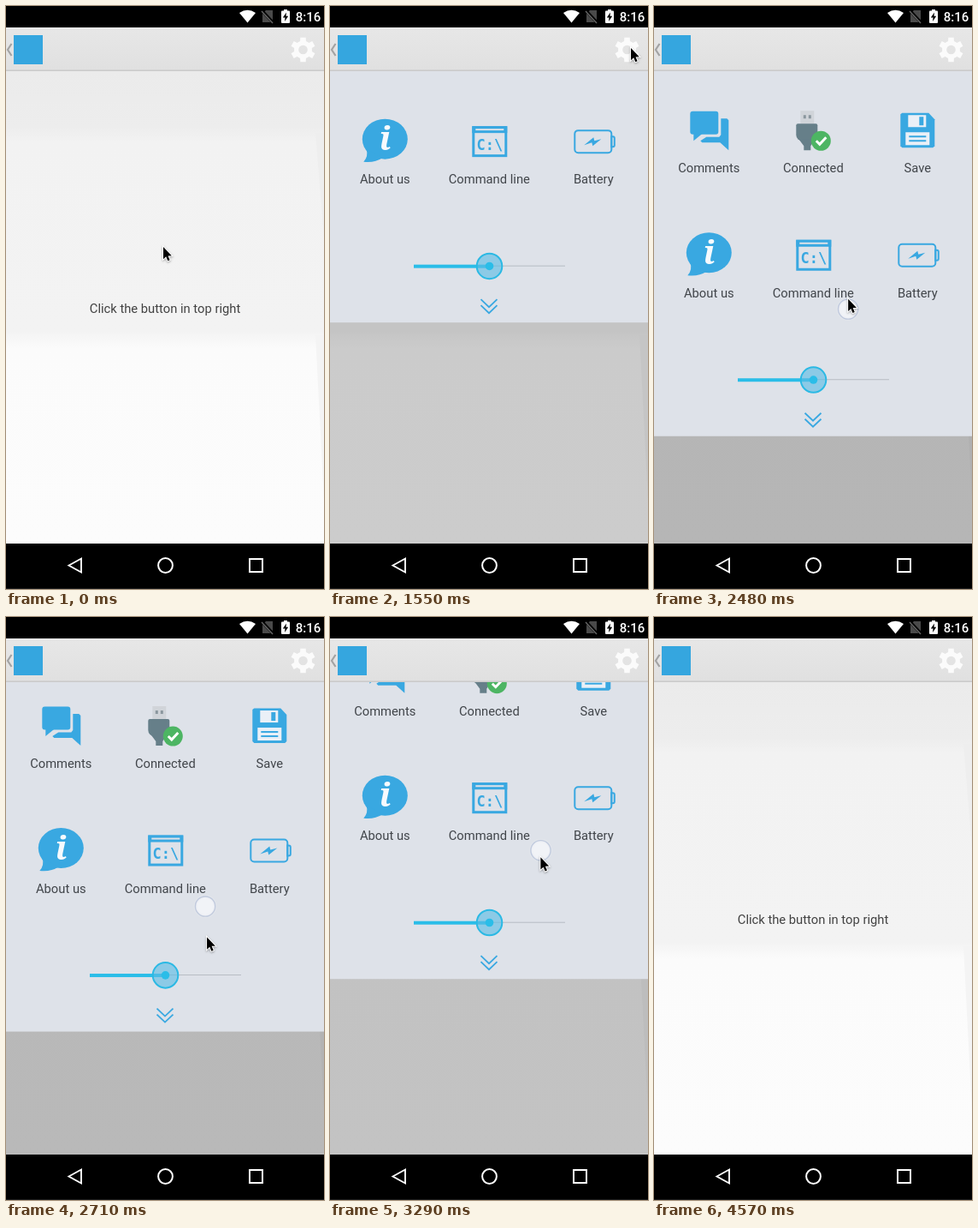
Animation, 372 px wide and 680 px high, one loop 5150 ms. Source, as an HTML page with a canvas:

```html
<!DOCTYPE html>
<html lang="en">
<head>
<meta charset="utf-8">
<title>Slide-down menu</title>
<style>
html, body { margin: 0; width: 100%; height: 100%; overflow: hidden; background: #000; }
canvas { display: block; width: 372px; height: 680px; }
</style>
</head>
<body>
<canvas id="stage" width="372" height="680"></canvas>
<script>
const c = document.getElementById('stage').getContext('2d');
const LOOP = 5150, W = 372, TOP = 76, BOTTOM = 627;
const BLUE = '#39a8e1', PANEL = '#dee2e9', FONT = 'Roboto, sans-serif';

// Keys are [time, value, value...], linear in between.
const cursorKeys = [
  [0, 184, 281], [440, 184, 281], [510, 175, 272], [650, 215, 215], [800, 298, 120],
  [950, 352, 49], [1600, 352, 49], [1720, 335, 140], [1900, 275, 370], [2050, 232, 515],
  [2160, 220, 543], [2250, 221, 540], [2400, 225, 400], [2550, 229, 292], [2620, 231, 308],
  [2710, 235, 373], [2880, 248, 452], [3030, 252, 476], [3130, 254, 482], [3280, 247, 300],
  [3420, 239, 50], [3500, 236, -25], [3680, 238, -25], [3770, 251, 88], [3850, 262, 140],
  [3960, 278, 225], [4110, 298, 425], [4210, 310, 553], [4290, 320, 638], [4400, 326, 660],
  [4560, 332, 682], [5150, 332, 700]
];
const touchKeys = [
  [1230, 351, 51], [1520, 351, 51], [2240, 221, 540], [2300, 222, 520], [2430, 226, 390],
  [2570, 229, 290], [2640, 231, 300], [2710, 233, 337], [2880, 248, 430], [3030, 255, 470],
  [3140, 255, 478], [3300, 246, 260], [3450, 236, 20], [3600, 236, 20]
];
const touchAlpha = [
  [1230, 0], [1270, 1], [1400, 1], [1480, 0], [2240, 0], [2290, 1], [3520, .95], [3600, 0]
];
const sheetKeys = [
  [1400, 76], [1500, 285], [1600, 450], [1750, 600], [1900, 680], [2050, 711], [2250, 711],
  [2300, 685], [2430, 540], [2570, 435], [2640, 445], [2710, 483], [2860, 565], [3000, 627],
  [3140, 627], [3300, 410], [3450, 120], [3500, 76]
];

function at(keys, t) {
  if (t <= keys[0][0]) return keys[0].slice(1);
  for (let i = 1; i < keys.length; i++) {
    const a = keys[i - 1], b = keys[i];
    if (t <= b[0]) {
      const k = (t - a[0]) / (b[0] - a[0]);
      return a.slice(1).map((v, j) => v + (b[j + 1] - v) * k);
    }
  }
  return keys[keys.length - 1].slice(1);
}

function rect(x, y, w, h, color) { c.fillStyle = color; c.fillRect(x, y, w, h); }

function trace(points, closed) {
  c.beginPath();
  for (let i = 0; i < points.length; i += 2) c.lineTo(points[i], points[i + 1]);
  if (closed) c.closePath();
}
function poly(points, color) { trace(points, true); c.fillStyle = color; c.fill(); }
function line(points, color, width, closed) {
  trace(points, closed);
  c.strokeStyle = color; c.lineWidth = width; c.stroke();
}
function disc(x, y, r, fill, stroke, width) {
  c.beginPath(); c.arc(x, y, r, 0, Math.PI * 2);
  if (fill) { c.fillStyle = fill; c.fill(); }
  if (stroke) { c.strokeStyle = stroke; c.lineWidth = width; c.stroke(); }
}
function round(x, y, w, h, r, color) {
  c.beginPath(); c.roundRect(x, y, w, h, r); c.fillStyle = color; c.fill();
}
function text(s, x, y, color, font = '14.75px ' + FONT) {
  c.font = font; c.fillStyle = color; c.textAlign = 'center'; c.fillText(s, x, y);
}

function page() {
  const g = c.createLinearGradient(0, TOP, 0, BOTTOM);
  const stops = [[76, '#ebebeb'], [141, '#ededed'], [158, '#f2f2f2'], [379, '#f3f3f3'], [399, '#fbfbfb'], [627, '#fcfcfc']];
  for (const [y, color] of stops) g.addColorStop((y - TOP) / (BOTTOM - TOP), color);
  rect(0, TOP, W, BOTTOM - TOP, g);
  poly([362, 148, 372, 148, 372, 270], '#eeeeee');
  poly([362, 384, 372, 384, 372, 577], '#f4f4f4');
  text('Click the button in top right', 186, 357.5, '#424242');
}

function gear(x, y) {
  c.beginPath();
  for (let i = 0; i < 6; i++) {
    const a = i * Math.PI / 3;
    for (const [d, r] of [[-.33, 10.6], [-.22, 14.6], [.22, 14.6], [.33, 10.6]])
      c.lineTo(x + r * Math.sin(a + d), y - r * Math.cos(a + d));
  }
  c.closePath();
  c.moveTo(x + 5.3, y);
  c.arc(x, y, 5.3, 0, Math.PI * 2, true);
  c.fillStyle = '#fbfbfb'; c.fill('evenodd');
}

function bars() {
  rect(0, 0, W, 25, '#000');
  const g = c.createLinearGradient(0, 25, 0, TOP);
  g.addColorStop(0, '#e7e7e7'); g.addColorStop(1, '#e0e0e0');
  rect(0, 25, W, 51, g);
  rect(0, 74, W, 1, '#d4d4d4');
  rect(0, 75, W, 1, '#cacaca');
  line([6.5, 44, 2, 51, 6.5, 58], '#a3a3a3', 2.2);
  rect(9, 34, 34, 34, '#35a6df');
  gear(347.5, 51);

  // Status icons
  c.beginPath(); c.moveTo(282.5, 19.5); c.lineTo(273, 8);
  c.quadraticCurveTo(282.5, 1.5, 292, 8); c.closePath();
  c.fillStyle = '#fff'; c.fill();
  poly([304, 5, 312, 5, 312, 19, 300, 19, 300, 9], '#4a4a4a');
  line([299, 5, 313, 20], '#000', 3.4);
  line([299, 6, 312, 20], '#666', 1.4);
  round(322, 5.5, 10, 14.5, 1, '#fff');
  rect(325, 4, 4, 2, '#fff');
  poly([328, 7.5, 323.8, 13.6, 326.5, 13.6, 326, 18, 330.2, 11.8, 327.5, 11.8], '#000');
  text('8:16', 353.5, 18, '#fff', '500 15px ' + FONT);

  // Navigation
  rect(0, BOTTOM, W, 53, '#000');
  rect(0, 679, W, 1, '#1c1c1c');
  line([73.5, 652.5, 88, 644.5, 88, 660.5], '#fff', 1.9, true);
  disc(186.5, 652.5, 8.4, null, '#fff', 2);
  c.strokeRect(285, 645, 15, 15);
}

// Each icon is drawn around its own centre.
const icons = {
  'Report'() {
    rect(-26, 5, 16, 22, BLUE);
    rect(-8, -8, 16, 35, BLUE);
    rect(10, -22, 17, 49, BLUE);
    line([-23, -7, -12, -18], BLUE, 4.5);
    poly([-20, -22, -8, -22, -8, -10], BLUE);
  },
  'Money'() {
    c.beginPath();
    c.moveTo(-6, -13);
    c.bezierCurveTo(-18, -6, -25, 8, -24, 17);
    c.bezierCurveTo(-23, 24, -14, 26, 0, 26);
    c.bezierCurveTo(14, 26, 23, 24, 24, 17);
    c.bezierCurveTo(25, 8, 18, -6, 6, -13);
    c.closePath();
    c.fillStyle = BLUE; c.fill();
    poly([-6, -16, -12, -24, -5, -23, -1, -27, 4, -23, 11, -24, 6, -16], BLUE);
    line([-9, -14, 9, -14], BLUE, 2.5);
    text('$', 0, 15, '#f2f6fb', '700 23px ' + FONT);
  },
  'Time line'() {
    rect(-26, -27, 4, 53, BLUE);
    for (const [x, y] of [[-2, -14], [18, 0], [-10, 14]]) {
      rect(-23, y - 1.5, 50, 3, BLUE);
      poly([x - 6, y, x, y - 5, x + 6, y, x, y + 5], BLUE);
    }
  },
  'Comments'() {
    c.beginPath(); c.roundRect(-22, -22.5, 33, 27, 3);
    c.fillStyle = BLUE; c.fill();
    poly([-18, 3, -18, 12, -7, 3], BLUE);
    poly([14, -14, 21, -14, 23, -12, 23, 23, 13, 14, -8, 14, -10, 12, -3, 7.5, 12, 7.5, 14, 5], BLUE);
  },
  'Connected'() {
    rect(-15, -23, 16, 15, '#d0d4d9');
    rect(-11.5, -18, 3, 4, '#8b979e');
    rect(-5.5, -18, 3, 4, '#8b979e');
    round(-20, -8, 25, 20, [2, 2, 7, 7], '#667f89');
    poly([-17, 10, 2, 10, -3, 18, -3, 23, -11, 23, -11, 18], '#667f89');
    disc(9, 12, 11.5, '#4db563');
    line([3.5, 12, 7.5, 16, 15, 8], '#fff', 3);
  },
  'Save'() {
    poly([-20, -19, -18, -20.5, 13, -20.5, 20, -13, 20, 18, 18, 20, -18, 20, -20, 18], BLUE);
    rect(-11, -18, 21, 14, '#eaf0f7');
    rect(2, -16, 5, 10, BLUE);
    rect(-14, 2, 28, 15, '#eaf0f7');
    rect(-10, 6, 20, 2, BLUE);
    rect(-10, 11, 20, 2, BLUE);
  },
  'About us'() {
    c.beginPath(); c.ellipse(0, -3, 26.5, 23.5, 0, 0, Math.PI * 2);
    c.fillStyle = BLUE; c.fill();
    c.beginPath(); c.moveTo(-22, 8);
    c.quadraticCurveTo(-19, 17, -25, 23.5);
    c.quadraticCurveTo(-12, 25, -3, 19);
    c.closePath(); c.fill();
    text('i', 0, 10, '#f7fafd', 'italic 700 39px "Noto Serif", serif');
  },
  'Command line'() {
    c.strokeStyle = BLUE; c.lineWidth = 3;
    c.strokeRect(-18.5, -16.5, 38, 33);
    rect(-20, -18, 41, 8, BLUE);
    rect(-16, -15, 33, 2, PANEL);
    text('C:\\', .5, 9.5, BLUE, '700 17px "DejaVu Sans Mono", monospace');
  },
  'Battery'() {
    c.strokeStyle = BLUE; c.lineWidth = 2;
    c.beginPath(); c.roundRect(-22, -13, 43, 26, 4); c.stroke();
    c.beginPath(); c.roundRect(21, -6, 3.5, 12, [0, 2, 2, 0]); c.stroke();
    poly([-11, 4, 0, -5, 1, -1, 9, -3, -1, 5, -2, 1], BLUE);
  }
};

function sheet(bottom) {
  if (bottom <= TOP) return;
  c.save();
  c.beginPath(); c.rect(0, TOP, W, BOTTOM - TOP); c.clip();
  const shown = Math.min(1, (bottom - TOP) / (BOTTOM - TOP));
  rect(0, TOP, W, BOTTOM - TOP, `rgba(0,0,0,${.36 * shown})`);
  rect(0, TOP, W, bottom - TOP, PANEL);
  c.translate(0, bottom - BOTTOM);

  Object.keys(icons).forEach((name, i) => {
    const x = 64.3 + 122 * (i % 3), y = 125 + 145.5 * Math.floor(i / 3);
    c.save(); c.translate(x, y); icons[name](); c.restore();
    text(name, x, y + 49, i ? '#41454a' : '#000');
  });

  rect(186, 560.5, 89, 1, '#b6bcc4');
  rect(98, 559.5, 88, 4, '#2abde8');
  disc(186.5, 561.3, 14.8, 'rgba(90,188,228,.62)', '#2bb9e4', 2);
  disc(186.5, 561.3, 4.8, '#2abde8');
  for (const y of [600, 607]) line([176.5, y, 186, y + 9, 195.5, y], BLUE, 1.8);
  c.restore();
}

function touch(t) {
  const alpha = at(touchAlpha, t)[0];
  if (alpha <= 0) return;
  const [x, y] = at(touchKeys, t);
  c.save();
  c.globalAlpha = alpha;
  disc(x, y, 13.5, 'rgba(255,255,255,.14)');
  disc(x, y, 11.6, 'rgba(250,251,255,.5)', 'rgba(165,178,208,.6)', 1.4);
  disc(x, y, 9.5, 'rgba(255,255,255,.22)');
  c.restore();
}

function cursor(t) {
  const [x, y] = at(cursorKeys, t);
  c.save();
  c.translate(x, y);
  const shape = [0, 0, 0, 14.2, 3.2, 11.3, 5.3, 16.2, 7.6, 15.2, 5.5, 10.4, 9.8, 10.2];
  c.shadowColor = 'rgba(0,0,0,.35)'; c.shadowBlur = 2.5; c.shadowOffsetY = 1;
  line(shape, '#fff', 2, true);
  c.shadowColor = 'transparent';
  poly(shape, '#000');
  c.restore();
}

function frame(now) {
  const t = now % LOOP;
  page();
  sheet(at(sheetKeys, t)[0]);
  bars();
  touch(t);
  cursor(t);
  requestAnimationFrame(frame);
}
requestAnimationFrame(frame);
</script>
</body>
</html>
```
